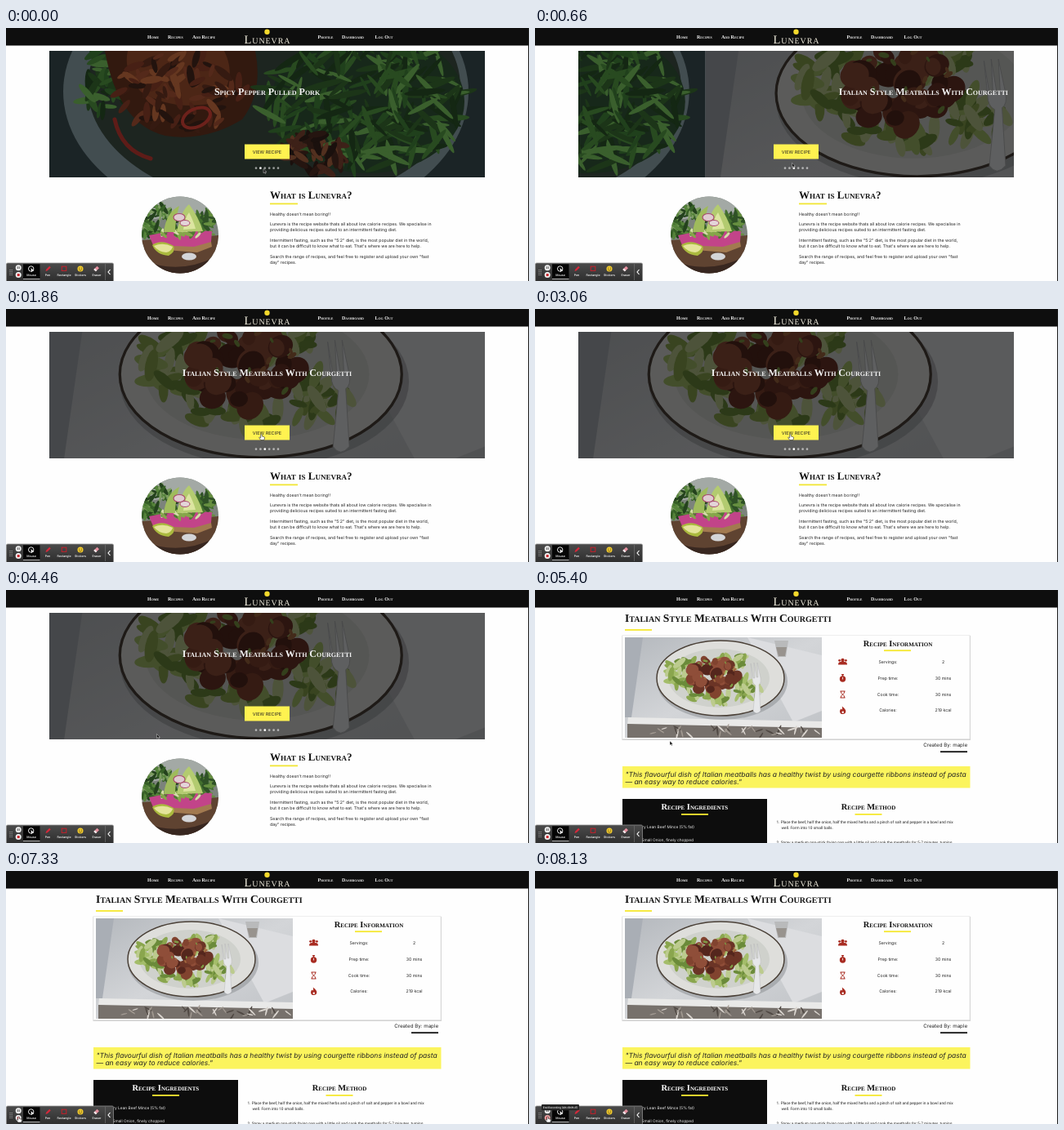
An HTML page that plays this animation: 640 px wide and 310 px high, repeating every 8.2 s.

```html
<!DOCTYPE html>
<html lang="en">
<head>
<meta charset="utf-8">
<title>Recipe site walkthrough</title>
<style>
html, body { margin: 0; width: 100%; height: 100%; overflow: hidden; background: #fefefe; }
svg { display: block; }
text { font: 5.2px Inter, "Open Sans", sans-serif; fill: #222; text-rendering: geometricPrecision; }
.caps { font-family: "Liberation Serif", "Noto Serif", serif; font-variant: small-caps; }
.bold { font-weight: bold; fill: #111; }
.nav { font-size: 6px; font-weight: bold; fill: #f4f4f4; }
.slide { font-size: 12px; font-weight: bold; fill: #f4f4f4; }
.head { font-size: 10.4px; }
.mid { text-anchor: middle; }
.end { text-anchor: end; }
.item { font-size: 4.8px; fill: #eee; }
.step { font: 4.8px Roboto, "Open Sans", sans-serif; }
.tool { font-size: 3.6px; font-weight: 500; fill: #fff; text-anchor: middle; }
.quote { font-size: 8.5px; font-style: italic; }
</style>
</head>
<body>
<svg id="stage" width="100%" height="100%" viewBox="0 0 640 310">
  <defs>
    <linearGradient id="linen" x2="1" y2="1">
      <stop stop-color="#b4b8bd"/><stop offset=".5" stop-color="#d3d5d8"/><stop offset="1" stop-color="#bfc2c6"/>
    </linearGradient>
    <linearGradient id="bar" x2="0" y2="1">
      <stop stop-color="#4b4b4b"/><stop offset="1" stop-color="#2d2d2d"/>
    </linearGradient>
    <clipPath id="round"><circle cx="213" cy="253.5" r="47"/></clipPath>
    <symbol id="dish" viewBox="0 0 241 123" preserveAspectRatio="xMidYMid slice">
      <rect width="241" height="123" fill="url(#linen)"/>
      <path d="M0 0H22L8 98H0Z" fill="#a9aeb5"/>
      <path d="M150 0L241 22V90L206 104Z" fill="#dcdde0"/>
      <path d="M183 4H200L197 24H187Z" fill="#b9babb"/>
      <path d="M185 12H198L196 23H188Z" fill="#98938e"/>
      <path d="M4 98L241 103V112L3 107Z" fill="#e9e9e8"/>
      <path d="M3 106L241 111V123H3Z" fill="#77716c"/>
      <g id="grain"/>
      <ellipse cx="119" cy="54" rx="80" ry="47" fill="#8f9296" opacity=".55"/>
      <ellipse cx="117" cy="50" rx="78" ry="46" fill="#dededb" stroke="#4a4037" stroke-width="1.5"/>
      <ellipse cx="115" cy="50" rx="62" ry="36" fill="#cfd1cc"/>
      <g id="ribbons"/>
      <g id="meatballs"/>
      <path d="M154 32L156 51Q156 57 160 59L157 90Q161 96 166 90L164 58Q167 56 166 50L162 31L163 49H161L158 31L159 50H157Z" fill="#e6e7e9" stroke="#b0b2b4" stroke-width=".4"/>
    </symbol>
  </defs>

  <rect width="640" height="310" fill="#fefefe"/>

  <g id="home">
    <svg x="53" y="28" width="533" height="155">
      <g id="pork">
        <rect width="533" height="155" fill="#1b2426"/>
        <ellipse cx="265" cy="50" rx="248" ry="168" fill="#424d50"/>
        <ellipse cx="275" cy="44" rx="228" ry="146" fill="#1d2520"/>
        <ellipse cx="390" cy="62" rx="118" ry="88" fill="#17281a"/>
        <g id="herbs"/>
        <path d="M68 0H252Q262 50 236 84Q190 112 142 104Q84 90 68 0Z" fill="#32190f"/>
        <path d="M96 0H214Q232 36 202 64Q150 74 112 50Q90 26 96 0Z" fill="#4c2616"/>
        <g id="pulled"/>
        <g id="rocket"/>
        <g id="shreds"/>
        <path d="M80 84Q88 122 124 132" fill="none" stroke="#5e1c18" stroke-width="5" stroke-linecap="round"/>
        <ellipse cx="180" cy="82" rx="18" ry="11" fill="none" stroke="#6c211b" stroke-width="4" transform="rotate(-25 180 82)"/>
        <text class="caps slide mid" x="266.5" y="53.5">Spicy Pepper Pulled Pork</text>
      </g>
      <g id="meat">
        <use href="#dish" width="533" height="155"/>
        <rect width="533" height="155" opacity=".59"/>
        <text class="caps slide mid" x="266.5" y="53.5">Italian Style Meatballs With Courgetti</text>
      </g>
    </svg>
    <rect x="292" y="142.5" width="55" height="18" fill="#fff250"/>
    <text class="mid" x="319.5" y="153.5" style="font-size:5.6px">VIEW RECIPE</text>
    <g id="dots" fill="#fff"/>

    <g clip-path="url(#round)">
      <rect x="166" y="206" width="94" height="95" fill="#7c837c"/>
      <path d="M166 206H260V224L166 236Z" fill="#a3a9a5"/>
      <path d="M166 260L260 254V301H166Z" fill="#5f4331"/>
      <path d="M166 284Q214 304 260 278V301H166Z" fill="#382720"/>
      <g id="leaves"/>
      <path d="M178 260L250 256L252 268L234 275L184 271Z" fill="#a27a50"/>
      <path d="M175 254Q212 246 252 249L251 262L230 268L180 266Z" fill="#c24489"/>
      <g id="topping"/>
      <path d="M193 250Q196 226 212 218Q207 236 207 250Z" fill="#9fbb5c"/>
      <path d="M209 250Q214 224 224 216Q236 232 241 249Z" fill="#b3cb70"/>
      <path d="M217 247Q219 232 224 226Q230 238 232 246Z" fill="#dce5a0"/>
      <ellipse cx="212" cy="232" rx="7" ry="4.5" fill="#dfcbd1" stroke="#a94a6d" stroke-width="1.2"/>
      <ellipse cx="219" cy="239" rx="6" ry="3.5" fill="#e4d5d9" stroke="#a94a6d"/>
      <path d="M179 266Q190 258 205 267Q208 274 199 279Q184 278 179 266Z" fill="#aab93e"/>
      <path d="M181 267Q192 262 204 268Q202 274 196 275Q186 274 181 267Z" fill="#e4e49a"/>
      <ellipse cx="224" cy="280" rx="9" ry="4.5" fill="#d4d5d8"/>
    </g>

    <text class="caps bold" x="323" y="209" style="font-size:13px">What is Lunevra?</text>
    <rect x="323" y="214.5" width="34" height="1.8" fill="#f1e634"/>
    <text x="323" y="230">Healthy doesn't mean boring!!</text>
    <text x="323" y="242.3">Lunevra is the recipe website thats all about low calorie recipes. We specialise in</text>
    <text x="323" y="249.3">providing delicious recipes suited to an intermittent fasting diet.</text>
    <text x="323" y="262">Intermittent fasting, such as the "5:2" diet, is the most popular diet in the world,</text>
    <text x="323" y="269">but it can be difficult to know what to eat. That's where we are here to help.</text>
    <text x="323" y="282">Search the range of recipes, and feel free to register and upload your own "fast</text>
    <text x="323" y="289">day" recipes.</text>
  </g>

  <g id="recipe">
    <text class="caps bold" x="110" y="38.5" style="font-size:13.6px">Italian Style Meatballs With Courgetti</text>
    <rect x="110" y="48" width="33" height="1.8" fill="#f6e830"/>
    <rect x="106.5" y="56" width="426.5" height="128" fill="#d2d2d2"/>
    <rect x="107" y="55.5" width="425" height="127" fill="#fefefe" stroke="#e4e4e4" stroke-width=".6"/>
    <use href="#dish" x="110" y="58" width="241" height="123"/>
    <text class="caps bold head mid" x="444" y="69">Recipe Information</text>
    <rect x="427" y="73.3" width="33" height="1.8" fill="#f6e830"/>
    <g fill="#a82c22">
      <path d="M371 91.5Q371 88 374 88H379Q382 88 382 91.5Z"/>
      <circle cx="376.5" cy="86" r="2.2"/><circle cx="372.6" cy="86.3" r="1.4"/><circle cx="380.4" cy="86.3" r="1.4"/>
      <circle cx="376.5" cy="109" r="3.7"/><path d="M375 103H378V104.2H377.2V106H375.8V104.2H375Z"/>
      <path d="M376.1 106.8H376.9V109.5H376.1Z" fill="#fff"/>
      <path d="M373.5 124H379.5M373.5 132H379.5M374.2 124Q374.2 126.5 376.5 128Q374.2 129.5 374.2 132M378.8 124Q378.8 126.5 376.5 128Q378.8 129.5 378.8 132" fill="none" stroke="#a82c22"/>
      <path d="M375.8 142.5Q380.3 146 380.3 148.7Q380 152 376.6 152Q373 152 373 148.4Q373.2 146.5 374.5 145.4L375.4 146.8Q376.6 145 375.8 142.5Z"/>
      <circle cx="376.7" cy="149.7" r="1.2" fill="#fff"/>
    </g>
    <g class="mid">
      <text x="432" y="90">Servings:</text><text x="499.5" y="90">2</text>
      <text x="432" y="109.7">Prep time:</text><text x="499.5" y="109.7">30 mins</text>
      <text x="432" y="129.5">Cook time:</text><text x="499.5" y="129.5">30 mins</text>
      <text x="432" y="149.2">Calories:</text><text x="499.5" y="149.2">219 kcal</text>
    </g>
    <text class="end" x="529" y="192" style="font-size:6.2px">Created By: maple</text>
    <rect x="496" y="197.3" width="33" height="1.8" fill="#111"/>
    <rect x="107" y="216" width="425.5" height="26.5" fill="#fbf45d"/>
    <text class="quote" x="110.5" y="229">"This flavourful dish of Italian meatballs has a healthy twist by using courgette ribbons instead of pasta</text>
    <text class="quote" x="110.5" y="238.3">— an easy way to reduce calories."</text>
    <rect x="107" y="256" width="177" height="54" fill="#0d0d0d"/>
    <text class="caps bold head mid" x="195.3" y="269.3" style="fill:#fff">Recipe Ingredients</text>
    <rect x="179" y="274" width="33" height="1.8" fill="#f6e830"/>
    <text class="item end" x="195" y="291.5">Very Lean Beef Mince (5% fat)</text>
    <text class="item end" x="194" y="308">½ Small Onion, finely chopped</text>
    <text class="caps bold head mid" x="408" y="269.3">Recipe Method</text>
    <rect x="391.5" y="274" width="33" height="1.8" fill="#f6e830"/>
    <text class="step" x="295.5" y="286">1. Place the beef, half the onion, half the mixed herbs and a pinch of salt and pepper in a bowl and mix</text>
    <text class="step" x="301.5" y="293.3">well. Form into 10 small balls.</text>
    <text class="step" x="295.5" y="310.5">2. Spray a medium non-stick frying pan with a little oil and cook the meatballs for 5-7 minutes, turning</text>
  </g>

  <rect width="640" height="21.5" fill="#0e0e0e"/>
  <text class="caps nav" x="173" y="12.6">Home</text>
  <text class="caps nav" x="198" y="12.6">Recipes</text>
  <text class="caps nav" x="228" y="12.6">Add Recipe</text>
  <text class="caps nav" x="381.5" y="12.6">Profile</text>
  <text class="caps nav" x="411" y="12.6">Dashboard</text>
  <text class="caps nav" x="451.5" y="12.6">Log Out</text>
  <text class="caps mid" x="320" y="18.7" style="font-size:14.5px;letter-spacing:.9px;fill:#f3efe0">Lunevra</text>
  <circle cx="319.5" cy="4.7" r="3.2" fill="#f4d92c"/>
  <rect x="639" width="1" height="310" fill="#1c1c1c"/>

  <g id="recorder">
    <rect x=".5" y="288" width="131" height="23" rx="1.5" fill="url(#bar)" stroke="#8b8b8b" stroke-width=".8"/>
    <path d="M5 296V303M7.2 296V303" stroke="#aaa" stroke-width="1" stroke-dasharray="1 1"/>
    <circle cx="15.2" cy="293.7" r="3.5" fill="#f3f3f3"/>
    <path d="M14.2 292.2V295.2M16.2 292.2V295.2" stroke="#333" stroke-width=".8"/>
    <circle id="stop" cx="15.2" cy="302.6" r="3.5" fill="#f3f3f3"/>
    <rect x="13.7" y="301.1" width="3" height="3" fill="#c8252c"/>
    <rect x="21" y="289.3" width="20.5" height="18.5" fill="#050505"/>
    <rect x="21" y="307" width="20.5" height=".8" fill="#ddd"/>
    <circle cx="30.7" cy="295" r="3.2" fill="none" stroke="#fff" stroke-width=".9"/>
    <path d="M30.5 294L34.3 297.5L32.3 297.8L31.2 299.3Z" fill="#fff"/>
    <path d="M48.5 298L49.2 295.7L53.2 291.8L54.8 293.4L50.8 297.3Z" fill="#d5283a"/>
    <rect x="68.2" y="292.2" width="5.6" height="5.2" fill="none" stroke="#c5202b"/>
    <circle cx="91" cy="295" r="3.5" fill="#f5ce2e"/>
    <path d="M89 295.7Q91 298.7 93 295.7" fill="none" stroke="#4b3510" stroke-width=".7"/>
    <circle cx="89.8" cy="294" r=".5"/><circle cx="92.2" cy="294" r=".5"/>
    <path d="M107.3 296L111.5 291.8L114 294.2L109.8 298.3Z" fill="#e58f9e"/>
    <path d="M107.3 296L108.8 294.5L111.3 296.9L109.8 298.3Z" fill="#eee"/>
    <text class="tool" x="31" y="303.6">Mouse</text>
    <text class="tool" x="51" y="303.6">Pen</text>
    <text class="tool" x="71" y="303.6">Rectangle</text>
    <text class="tool" x="91" y="303.6">Stickers</text>
    <text class="tool" x="111" y="303.6">Eraser</text>
    <path d="M121.5 289V309" stroke="#777" stroke-width=".6"/>
    <path d="M127.5 296L125 299L127.5 302" fill="none" stroke="#fff" stroke-width="1.1"/>
  </g>
  <g id="tip">
    <rect x="8" y="286" width="46" height="7.2" rx="1" fill="#252525"/>
    <text class="tool" x="31" y="291" style="font-size:3.2px">End Recording (Alt+Shift+E)</text>
  </g>

  <path id="arrow" d="M0 0V5.2L1.3 4.1L2.2 6L3.1 5.6L2.3 3.8H3.9Z" fill="#111" stroke="#fff" stroke-width=".4"/>
  <path id="hand" d="M-.8 .6Q0-.6 .8 .6V2.5L3.4 3.2Q4.2 3.5 4 4.5L3.3 7H-.8L-2.8 4.2Q-2.6 3.2-1.6 3.8L-.8 4.4Z" fill="#fff" stroke="#222" stroke-width=".6"/>
</svg>
<script>
const $ = id => document.getElementById(id);
const LOOP = 8200, WIDTH = 533;
const SLIDE_AT = 415, DECAY = 200, PAGE_AT = 5130, TIP_AT = 7460;

let seed = 7;
const rand = () => (seed = seed * 16807 % 2147483647) / 2147483647;

function add(parent, tag, attrs) {
  const el = document.createElementNS("http://www.w3.org/2000/svg", tag);
  for (const k in attrs) el.setAttribute(k, attrs[k]);
  return $(parent).appendChild(el);
}

// Scatter n ellipses of about w by h inside an oval.
function scatter(id, n, cx, cy, rx, ry, w, h, colours) {
  for (let i = 0; i < n; i++) {
    const a = rand() * 2 * Math.PI, r = Math.sqrt(rand()), s = .6 + rand() * .6;
    const x = cx + rx * r * Math.cos(a), y = cy + ry * r * Math.sin(a);
    add(id, "ellipse", {
      rx: w * s, ry: h * s, fill: colours[i % colours.length],
      transform: `translate(${x} ${y}) rotate(${rand() * 180})`
    });
  }
}

const greens = ["#8aa64e", "#bccb8e", "#6b8b3a", "#a4bd6a"];
const darkGreens = ["#1c3518", "#284a20", "#142713", "#3a5f2d", "#20401c"];
scatter("grain", 34, 122, 116, 118, 6, 6, 1, ["#d9d4ce", "#4f4843", "#a29a92"]);
scatter("ribbons", 44, 72, 48, 24, 20, 8, 3, greens);
scatter("ribbons", 30, 145, 66, 21, 16, 8, 3, greens);
scatter("ribbons", 22, 132, 32, 24, 11, 7, 3, greens);
scatter("ribbons", 20, 104, 75, 24, 9, 7, 3, greens);
scatter("meatballs", 48, 109, 46, 30, 22, 7, 6, ["#6b3426", "#81432f", "#54261d", "#8f4e39"]);
scatter("meatballs", 14, 109, 44, 32, 22, 2.6, 1.3, ["#7f9a45", "#a3683f"]);
scatter("herbs", 34, 66, 40, 24, 42, 15, 4, darkGreens);
scatter("pulled", 80, 160, 50, 78, 48, 12, 4, ["#54291a", "#351a11", "#653720", "#22130e", "#472015"]);
scatter("rocket", 210, 388, 62, 122, 80, 22, 3.4, darkGreens);
scatter("shreds", 54, 322, 126, 38, 25, 12, 4, ["#3d2118", "#251510", "#52301f", "#1a100d"]);
scatter("leaves", 60, 186, 238, 20, 22, 8, 2.2, ["#365f26", "#55833a", "#24421d", "#7d9c62"]);
scatter("leaves", 40, 242, 242, 16, 18, 8, 2.2, ["#44702e", "#2f5126", "#668f40"]);
scatter("topping", 16, 216, 251, 30, 4, 6, 2, ["#86a64a", "#d5dca9", "#4f7a31"]);

const dots = Array.from({ length: 6 }, (_, i) =>
  add("dots", "circle", { cx: 306 + i * 5.4, cy: 171.7, r: 1.35 }));

// Pointer stops: time, x, y.
const path = [
  [0, 315, 172.5], [SLIDE_AT, 315.5, 171], [1060, 312.5, 153.5], [3600, 312.5, 153.5],
  [4460, 184.5, 176.5], [4730, 165, 185], [5400, 165, 185], [6460, 98, 211],
  [6600, 98, 211], [7330, 15.5, 301], [LOOP, 15.5, 301]
];

function pointer(t) {
  const i = path.findIndex(p => p[0] > t);
  const [t0, x0, y0] = path[i - 1], [t1, x1, y1] = path[i];
  const k = (t - t0) / (t1 - t0), e = k * k * (3 - 2 * k);
  return [x0 + (x1 - x0) * e, y0 + (y1 - y0) * e];
}

const show = (id, on) => $(id).setAttribute("display", on ? "inline" : "none");
const move = (id, x, y) => $(id).setAttribute("transform", `translate(${x} ${y})`);

function draw(t) {
  let rest = t < SLIDE_AT ? WIDTH : WIDTH * Math.exp((SLIDE_AT - t) / DECAY);
  if (rest < 2) rest = 0;
  move("pork", rest - WIDTH, 0);
  move("meat", rest, 0);
  const active = rest > WIDTH / 2 ? 1 : 2;
  dots.forEach((d, i) => d.setAttribute("opacity", i === active ? 1 : .55));

  show("home", t < PAGE_AT);
  show("recipe", t >= PAGE_AT);
  show("tip", t >= TIP_AT);
  $("stop").setAttribute("fill", t >= TIP_AT ? "#e9a3a3" : "#f3f3f3");

  const [x, y] = pointer(t);
  const hand = t > 800 && t < 3750 || t > 7300;
  show("hand", hand);
  show("arrow", !hand);
  move("hand", x, y);
  move("arrow", x, y);
}

const start = performance.now();
function tick() {
  draw((performance.now() - start) % LOOP);
  requestAnimationFrame(tick);
}
tick();
</script>
</body>
</html>
```
